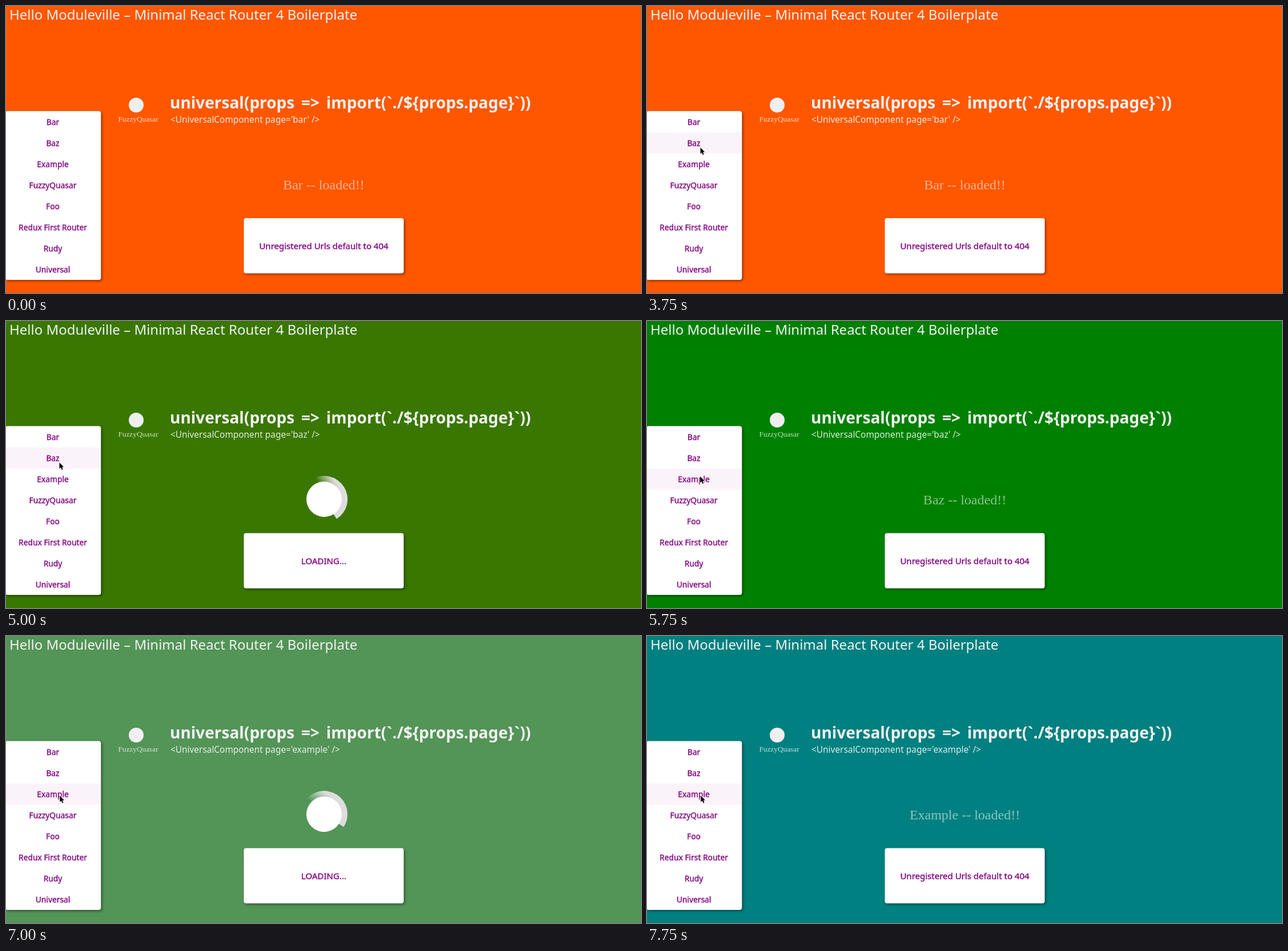
Animation of 1112x504 px, one loop 8000 ms. Source, as an HTML page with a canvas:

```html
<!DOCTYPE html>
<html lang="en">
<head>
<meta charset="utf-8">
<title>Universal component demo</title>
<style>
  html, body { margin: 0; width: 100%; height: 100%; overflow: hidden; background: #ff5700; }
  canvas { display: block; width: 1112px; height: 504px; }
</style>
</head>
<body>
<canvas id="stage" width="1112" height="504"></canvas>
<script>
const ctx = document.getElementById('stage').getContext('2d');
const W = 1112, H = 504, LOOP = 8000, STEP = 250;
const SANS = '"Noto Sans", "Open Sans", sans-serif';
const SERIF = '"Liberation Serif", "Noto Serif", serif';
const LIGHT = '#f3f3f3', PURPLE = '#800080';
const MENU = ['Bar', 'Baz', 'Example', 'FuzzyQuasar', 'Foo', 'Redux First Router', 'Rudy', 'Universal'];
const ROW = 37, MENU_TOP = 185;

// Pages: when each is requested, when it is ready, and its background change.
const PAGES = [
  { name: 'Bar', start: -5000, ready: 0, from: [255, 87, 0], to: [255, 87, 0] },
  { name: 'Baz', start: 4375, ready: 5750, from: [255, 87, 0], to: [0, 128, 0] },
  { name: 'Example', start: 6478, ready: 7750, from: [255, 191, 0], to: [0, 128, 128] }
];
const FADE = 1320, TURN = 1500;

// Pointer stops: time, x, y.
const POINTER = [
  [500, 515, 120], [1250, 173, 228], [1500, 156.5, 228], [1750, 100, 218], [2000, 98.5, 213.5],
  [3500, 98, 221], [3750, 93, 248], [5750, 92.5, 272.5], [6000, 93.8, 280]
];
// Hovered menu row: time, row.
const HOVER = [[0, -1], [1750, 0], [3750, 1], [5750, 2]];

const latest = (list, t, at) => list.filter(item => at(item) <= t).pop();

// The CSS "ease" curve.
function ease(x) {
  if (x <= 0) return 0;
  if (x >= 1) return 1;
  let lo = 0, hi = 1;
  for (let i = 0; i < 24; i++) {
    const u = (lo + hi) / 2;
    if (0.75 * u - 0.75 * u * u + u * u * u < x) lo = u; else hi = u;
  }
  return 0.3 * lo + 2.4 * lo * lo - 1.7 * lo * lo * lo;
}

function text(str, x, y, font, color, align = 'left') {
  ctx.font = font;
  ctx.fillStyle = color;
  ctx.textAlign = align;
  ctx.fillText(str, x, y);
}

// Purple link text, a touch heavier than regular.
function link(str, x, y, size) {
  text(str, x, y, `${size}px ${SANS}`, PURPLE, 'center');
  ctx.strokeStyle = PURPLE;
  ctx.lineWidth = 0.35;
  ctx.strokeText(str, x, y);
}

function card(x, y, w, h) {
  ctx.save();
  ctx.shadowColor = 'rgba(0, 0, 0, 0.45)';
  ctx.shadowBlur = 4;
  ctx.shadowOffsetX = ctx.shadowOffsetY = 2;
  ctx.fillStyle = '#fff';
  ctx.beginPath();
  ctx.roundRect(x, y, w, h, 4);
  ctx.fill();
  ctx.restore();
}

function disc(x, y, r, fill) {
  ctx.fillStyle = fill;
  ctx.beginPath();
  ctx.arc(x, y, r, 0, Math.PI * 2);
  ctx.fill();
}

function header(page) {
  text('Hello Moduleville – Minimal React Router 4 Boilerplate', 6, 23.5, `24px ${SANS}`, LIGHT);
  disc(228, 174, 13, '#efefef');
  text('FuzzyQuasar', 231.5, 203, `13.3px ${SERIF}`, 'rgba(255, 255, 255, 0.75)', 'center');
  ctx.wordSpacing = '4.5px';
  text('universal(props => import(`./${props.page}`))', 287, 180, `bold 28px ${SANS}`, LIGHT);
  ctx.wordSpacing = '0px';
  text(`<UniversalComponent page='${page.toLowerCase()}' />`, 288, 205, `15.4px ${SANS}`,
    'rgba(255, 255, 255, 0.86)');
}

function menu(row) {
  card(-1, MENU_TOP - 0.5, 167.3, ROW * MENU.length + 0.5);
  if (row >= 0) {
    ctx.fillStyle = '#fbf3fa';
    ctx.fillRect(0, MENU_TOP + row * ROW, 166, ROW);
  }
  if (row === 0) {
    ctx.fillStyle = '#fff7fd';
    ctx.fillRect(0, MENU_TOP + ROW, 166, 22);
  }
  MENU.forEach((label, i) => link(label, 82, MENU_TOP + 23.5 + i * ROW, 13.8));
}

function spinner(age) {
  const r = 41;
  ctx.save();
  ctx.translate(557, 313);
  ctx.rotate(age / TURN * Math.PI * 2);
  const fade = ctx.createLinearGradient(-r, 0, r, 0);
  fade.addColorStop(0.1, '#ddd');
  fade.addColorStop(0.42, 'rgba(221, 221, 221, 0)');
  disc(0, 0, r, fade);
  ctx.fillStyle = '#ddd';
  ctx.beginPath();
  ctx.moveTo(0, 0);
  ctx.arc(0, 0, r, Math.PI, Math.PI * 1.5);
  ctx.fill();
  disc(0, 0, 31, '#fff');
  ctx.restore();
}

function pointer(x, y) {
  ctx.save();
  ctx.translate(x, y);
  ctx.beginPath();
  ctx.moveTo(0.5, 0.5);
  [[0.5, 11.6], [3, 9.3], [4.8, 13.4], [6.6, 12.6], [4.9, 8.6], [8.2, 8.6]]
    .forEach(p => ctx.lineTo(...p));
  ctx.closePath();
  ctx.strokeStyle = '#fff';
  ctx.lineWidth = 1.2;
  ctx.stroke();
  ctx.fillStyle = '#000';
  ctx.fill();
  ctx.restore();
}

function draw(t) {
  const page = latest(PAGES, t, p => p.start);
  const loading = t < page.ready;
  const k = ease((t - page.start) / FADE);
  const rgb = page.from.map((c, i) => Math.round(c + (page.to[i] - c) * k));

  ctx.fillStyle = `rgb(${rgb})`;
  ctx.fillRect(0, 0, W, H);
  header(page.name);
  menu(latest(HOVER, t, h => h[0])[1]);

  if (loading) spinner(t - page.start - 10);
  else text(`${page.name} -- loaded!!`, 556.5, 321.5, `24px ${SERIF}`, 'rgba(255, 255, 255, 0.54)', 'center');

  card(416.5, 372.5, 280, 97);
  link(loading ? 'LOADING...' : 'Unregistered Urls default to 404', 556.5, 427, 15);

  const stop = latest(POINTER, t, p => p[0]);
  if (stop) pointer(stop[1], stop[2]);
}

const began = performance.now();
function tick() {
  const t = (performance.now() - began) % LOOP;
  draw(Math.floor(t / STEP) * STEP);
  requestAnimationFrame(tick);
}
tick();
</script>
</body>
</html>
```
